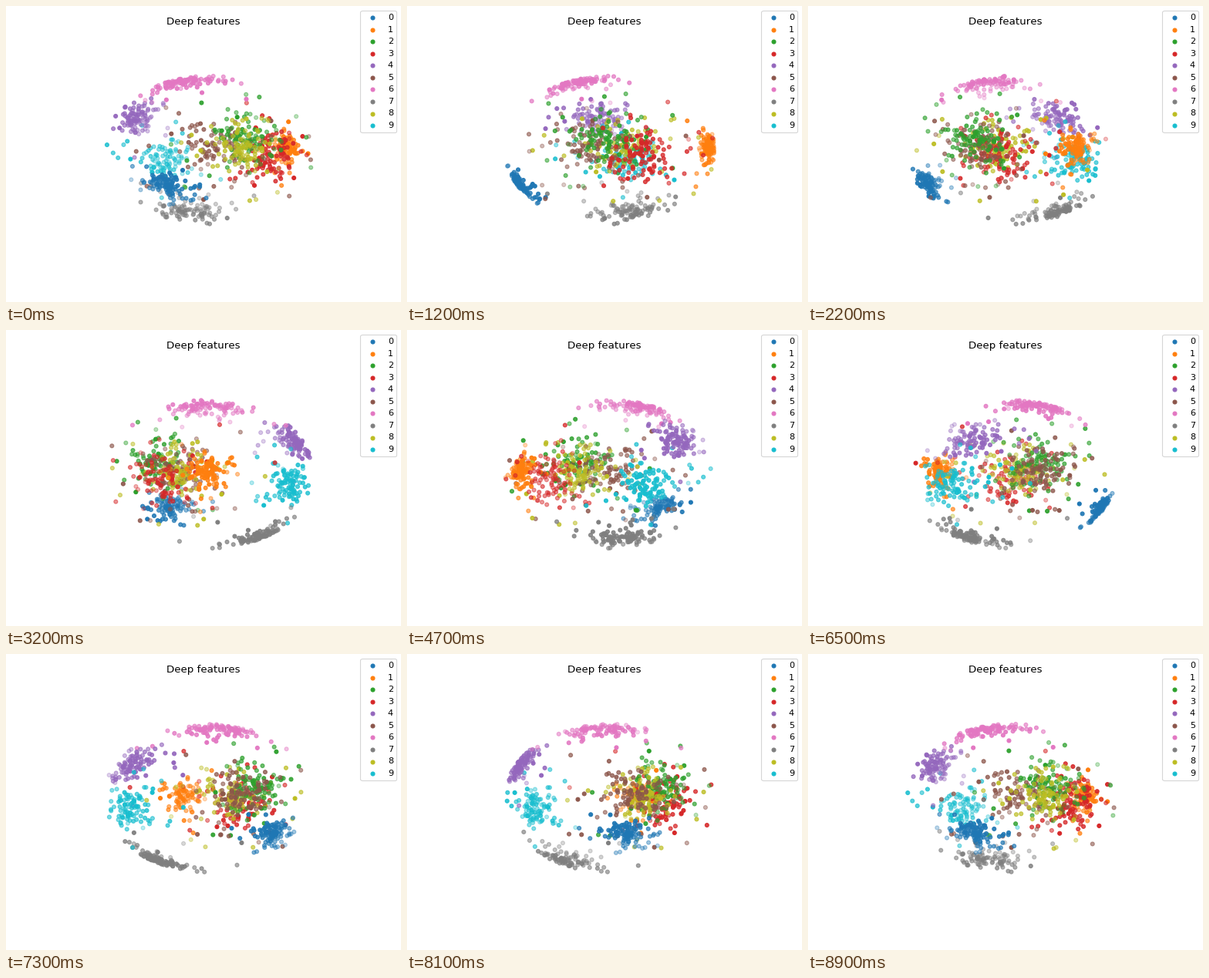
Recreate the animation shown at these times as a matplotlib script. Size 512x384 px, loop 9000 ms.

```python
import numpy as np
import matplotlib.pyplot as plt
from matplotlib.animation import FuncAnimation
from matplotlib.colors import to_rgb

W, H, DPI = 512, 384, 80
FRAMES, INTERVAL = 90, 100
CX, CY = 263, 187          # projected centre of the cloud
RADIUS, HEIGHT = 136, 96   # half axes of the enclosing spheroid
DIST = 2768                # camera distance
COUNT = 100                # points per class

# class centres: distance from the axis, azimuth in degrees, height
CENTRES = [(118, -25, -43), (121, 128, 3), (65, 45, 15), (76, 80, -6),
           (108, 235, 41), (38, 15, 4), (38, -42, 84), (62, 205, -78),
           (45, 70, 4), (95, 215, -12)]


def make_cloud(rng, dist, azim, height):
    """Points as (toward viewer, right, up); outer classes hug the spheroid."""
    reach = np.hypot(dist / RADIUS, height / HEIGHT)
    side = 44 - 0.2 * dist
    spread = 0.7 * side, side, 28 - 16 * reach
    tail = np.where(rng.random((COUNT, 1)) < 0.3, 1.5, 0.65)
    r, t, up = (rng.normal(size=(COUNT, 3)) * tail * spread).T
    r, up = r + dist, up + height
    phi = np.radians(azim)
    near = r * np.cos(phi) - t * np.sin(phi)
    right = r * np.sin(phi) + t * np.cos(phi)
    q = np.hypot(np.hypot(near, right) / RADIUS, up / HEIGHT)
    return np.array([near, right, up]) / np.maximum(q ** reach ** 4, q)


rng = np.random.default_rng(7)
clouds = [make_cloud(rng, *c) for c in CENTRES]

plt.rcParams["text.kerning_factor"] = 6
fig = plt.figure(figsize=(W / DPI, H / DPI), dpi=DPI, facecolor="white")
ax = fig.add_axes([0, 0, 1, 1])
ax.axis("off")

scatters = [ax.scatter(p[1] + CX, CY - p[2], s=20, color=f"C{i}", label=str(i))
            for i, p in enumerate(clouds)]
ax.set_xlim(0, W)
ax.set_ylim(H, 0)
ax.legend(loc="upper right", fontsize=10)
fig.text(0.5, 360 / H, "Deep features", ha="center", va="baseline", fontsize=12)


def update(i):
    theta = 2 * np.pi * i / FRAMES
    c, s = np.cos(theta), np.sin(theta)
    for k, (sc, (near, right, up)) in enumerate(zip(scatters, clouds)):
        depth = near * c + right * s
        zoom = 1 / (1 - depth / DIST)
        x = CX + (right * c - near * s) * zoom
        sc.set_offsets(np.column_stack([x, CY - up * zoom]))
        # farther points fade out
        alpha = 0.3 + 0.7 * (depth - depth.min()) / np.ptp(depth)
        rgba = [(*to_rgb(f"C{k}"), a) for a in alpha]
        sc.set_facecolor(rgba)
        sc.set_edgecolor(rgba)
        sc.set_zorder(2 + depth.max() / 1000)
    return scatters


anim = FuncAnimation(fig, update, frames=FRAMES, interval=INTERVAL,
                     init_func=lambda: update(0), repeat=True, repeat_delay=0)
plt.show()
```
